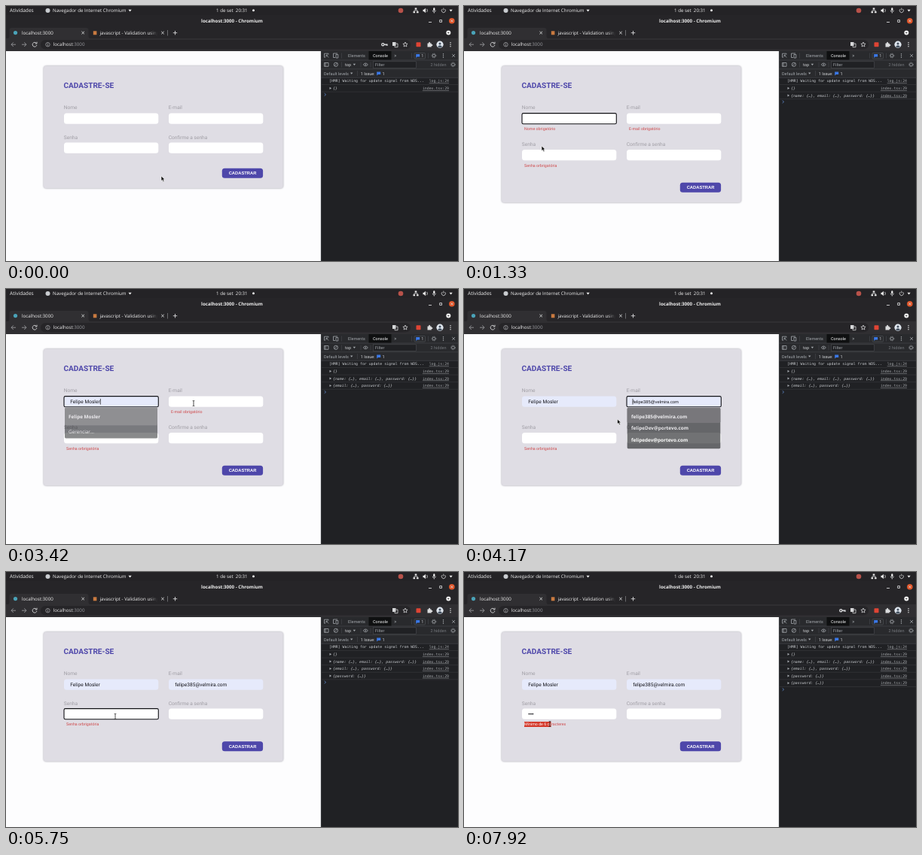
Recreate the animation shown at these times as an HTML page. Size 600 px wide and 339 px high, loop 8000 ms.

```html
<!DOCTYPE html>
<html lang="pt-BR">
<head>
<meta charset="utf-8">
<title>Cadastro</title>
<style>
  html, body { margin: 0; width: 100%; height: 100%; overflow: hidden; background: #fdfdfe; }
  svg { display: block; width: 100%; height: 100%; }
  text { text-rendering: geometricPrecision; white-space: pre; }
  .sys { font-family: "Open Sans", "Noto Sans", sans-serif; font-size: 6.2px; fill: #f0f0f0; }
  .bold { font-weight: 700; }
  .dev { font-family: Roboto, sans-serif; font-size: 5.5px; fill: #a4a8ad; }
  .mono { font-family: "DejaVu Sans Mono", monospace; font-size: 4.87px; fill: #c6c9cd; }
  .link { fill: #a2a5a9; text-decoration: underline; text-anchor: end; }
  .label { font-family: Roboto, sans-serif; font-size: 6.6px; fill: #a09ea5; }
  .value { font-family: Roboto, sans-serif; font-size: 6.6px; fill: #15151a; }
  .preview { font-family: "Liberation Sans", Arial, sans-serif; font-size: 5.8px; }
  .error { font-family: Roboto, sans-serif; font-size: 5.3px; fill: #cf4a4c; }
  .menu text { font-family: "Open Sans", "Noto Sans", sans-serif; font-size: 6.5px; fill: #fafafa; }
  .icon { fill: none; stroke: #d6d7d9; stroke-width: .9; }
  .dim { stroke: #98999c; }
  #card { filter: drop-shadow(0 .7px .9px rgba(40, 36, 60, .45)); }
</style>
</head>
<body>
<svg viewBox="0 0 600 339" preserveAspectRatio="none">
  <defs>
    <linearGradient id="fade">
      <stop offset="0" stop-color="#262528" stop-opacity="0"/>
      <stop offset="1" stop-color="#262528"/>
    </linearGradient>
    <clipPath id="tabClip"><rect x="120" y="28" width="81" height="15"/></clipPath>
    <clipPath id="selClip"><rect id="selArea" x="80" y="198.500" width="0" height="8"/></clipPath>
  </defs>
  <rect width="600" height="339" fill="#fdfdfe"/>

  <!-- desktop bar -->
  <rect width="600" height="12" fill="#242326"/>
  <g class="sys">
    <text x="5" y="8.200" style="font-size:6.6px">Atividades</text>
    <circle cx="55.500" cy="6" r="3" fill="#c9ccd0"/>
    <text x="62" y="8.200">Navegador de Internet Chromium</text>
    <path d="M162.500 4.800h4.200l-2.100 2.800z"/>
    <text x="279" y="8.200">1 de set  20:31</text>
    <circle cx="328.500" cy="5.800" r="1.500"/>
    <path d="M588.500 4.800h4.200l-2.100 2.800z"/>
    <path d="M553.500 4.800h1.500l2-2v6.400l-2-2h-1.500z"/>
    <rect x="567.200" y="2.300" width="2.200" height="4.300" rx="1.100"/>
    <path d="M542.700 2.500h2.600v2h-2.600zM540.500 7.200h2.600v2h-2.600zM545 7.200h2.600v2h-2.600z"/>
  </g>
  <circle cx="524" cy="6" r="3.300" fill="#b8524a"/>
  <path class="icon" style="stroke-width:.8" d="M544 4.500v1.400M541.800 7.200v-1.300h4.500v1.300M558.500 3.800q1.800 2.200 0 4.400M566.200 5.800q.2 2.100 2.100 2.100t2.100-2.100M568.300 7.900v1.700M579.200 4a2.600 2.600 0 1 0 3.200 0M580.800 2.600v3"/>

  <!-- window title and tabs -->
  <rect y="12" width="600" height="31" fill="#262528"/>
  <text class="sys bold" x="300" y="22.300" text-anchor="middle">localhost:3000 - Chromium</text>
  <circle cx="591.800" cy="19.700" r="3.800" fill="#e2582c"/>
  <path class="icon" d="M561 21.500h4M575.700 18.600h2.800v2.800h-2.800zM590.500 18.400l2.600 2.600m0-2.600l-2.600 2.600"/>
  <circle cx="587.300" cy="35.600" r="3" fill="#f0f0f0"/>
  <path d="M585.900 35l1.400 1.500 1.400-1.500z" fill="#262528"/>
  <path d="M2 43q2.500 0 2.500-3v-8q0-3 3-3h99q3 0 3 3v8q0 3 2.500 3z" fill="#302f32"/>
  <circle cx="12.500" cy="35.600" r="2.600" fill="#4aa3b8"/>
  <text class="sys" x="21" y="37.800">localhost:3000</text>
  <rect x="115.800" y="33.300" width="4.600" height="5" fill="#c97a40"/>
  <g clip-path="url(#tabClip)">
    <text class="sys" x="124.500" y="37.800">javascript - Validation using</text>
    <rect x="191" y="29" width="10" height="13" fill="url(#fade)"/>
  </g>
  <path class="icon" d="M100.400 33.800l3.600 3.600m0-3.600l-3.600 3.600M206.200 33.800l3.600 3.600m0-3.600l-3.600 3.600M224.500 33v5.400m-2.700-2.700h5.400"/>
  <path class="icon dim" style="stroke-width:.6" d="M214.500 32v7.500"/>

  <!-- address bar -->
  <rect y="43" width="600" height="17" fill="#302f32"/>
  <rect x="46" y="45" width="491" height="12.500" rx="6.250" fill="#262528"/>
  <path class="icon dim" d="M13 51.200H7m2.800-2.800L7 51.200 9.800 54M21 51.200h6m-2.800-2.800l2.800 2.800-2.800 2.800"/>
  <path class="icon" d="M40.200 49.300a2.900 2.900 0 1 0 .7 2.500M41 47.700v2.300h-2.300"/>
  <circle class="icon dim" cx="55.500" cy="51.200" r="2.700"/>
  <path class="icon dim" d="M55.500 50.700v2.200M55.500 49.300v.8"/>
  <text class="sys" x="62.700" y="53.300">localhost<tspan fill="#9a9ca0">:3000</tspan></text>
  <g id="key" fill="none" stroke="#e2e3e5" stroke-width="1.200">
    <circle cx="500.300" cy="51.200" r="1.600"/>
    <path d="M502 51.200h4v1.700M504.300 51.200v1.400"/>
  </g>
  <path fill="#d6d7d9" d="M513 48h4.500v5H513z"/>
  <path class="icon" style="stroke-width:.8" d="M517.500 50h2.500v4.700h-4v-1.600M514 49.500l2 2m0-2l-2 2M530 48l.9 2.100 2.200.2-1.700 1.500.5 2.200-1.900-1.200-1.900 1.200.5-2.200-1.700-1.500 2.200-.2z"/>
  <rect x="544.500" y="48.300" width="6" height="6" rx=".8" fill="#df4434"/>
  <path fill="#dadbdd" d="M559.500 49.500h1.600q-.2-1.700 1-1.700t1 1.700h1.600v1.600q1.700-.2 1.700 1t-1.700 1v1.500h-5.200z"/>
  <circle cx="576" cy="51.200" r="4.600" fill="#dfe6ee"/>
  <circle cx="576" cy="50" r="1.500" fill="#43505f"/>
  <path d="M572.900 54q3.100-3.600 6.200 0-3.100 2.500-6.200 0z" fill="#43505f"/>
  <g fill="#d6d7d9"><circle cx="590" cy="48.700" r=".8"/><circle cx="590" cy="51.200" r=".8"/><circle cx="590" cy="53.700" r=".8"/></g>

  <!-- devtools -->
  <rect x="418" y="60" width="182" height="279" fill="#202124"/>
  <rect x="418" y="60" width="182" height="35.300" fill="#292a2d"/>
  <rect x="481.500" y="60" width="30" height="12" fill="#0f1011"/>
  <path stroke="#47494d" stroke-width=".6" fill="none" d="M418.300 60v279M418 72h182M418 83.800h182M418 95.300h182M445.500 62.500v7M538.500 62.500v7M560.500 62.500v7M445.500 74.500v7M466.500 86v7M471 74.500v7M484 74.500v7"/>
  <g class="dev">
    <text x="454" y="67.900">Elements</text>
    <text x="487" y="67.900" style="fill:#f1f2f3">Console</text>
    <text x="515" y="68.200" style="font-size:7px">»</text>
    <text x="450" y="79.800" style="fill:#d5d7da">top</text>
    <path d="M460.700 76.800h3.400l-1.700 2.300zM457 88.500h3.400l-1.700 2.300z"/>
    <rect x="487.500" y="73.800" width="57" height="8.600" fill="#202124" stroke="#4c4e52" stroke-width=".6"/>
    <text x="490" y="79.900">Filter</text>
    <text x="563.500" y="79.800" style="fill:#75787d">2 hidden</text>
    <text x="422" y="91.500">Default levels</text>
    <text x="470.700" y="91.500" style="fill:#d5d7da">1 Issue:</text>
    <rect x="542" y="62.500" width="14.500" height="7.500" rx="1" fill="none" stroke="#55585d" stroke-width=".6"/>
    <path fill="#3b78e7" d="M544.200 64h5v3.600h-3.300l-1.700 1.500zM492.200 87.500h5v3.600h-3.300l-1.700 1.500z"/>
    <text x="551.300" y="67.900" style="fill:#d5d7da">1</text>
    <text x="499.500" y="91.500" style="fill:#d5d7da">1</text>
    <g><circle cx="580.500" cy="63.800" r=".7"/><circle cx="580.500" cy="66" r=".7"/><circle cx="580.500" cy="68.200" r=".7"/></g>
  </g>
  <g class="icon" style="stroke:#a4a8ad;stroke-width:.8">
    <path d="M428 64.500v-1.300h-5.500v5h1.500M425 65.200l3.200 3.200m-3.200-3.200v2.300m0-2.300h2.300M434.500 63h5.500M434.500 63v5.500h2.500M438 64.500h2.800v4.500H438zM592.200 64l3.800 3.800m0-3.800l-3.800 3.800M422.500 75.500h5.500v4.800h-5.500zM424.200 75.500v4.800M436 79.600l3.800-3.800M474.200 77.900q3.100-3.800 6.200 0-3.100 3.800-6.200 0z"/>
    <circle cx="437.900" cy="77.800" r="2.600"/><circle cx="477.300" cy="77.900" r=".6"/>
    <circle cx="568" cy="66" r="1.900"/><circle cx="593.500" cy="77.900" r="1.900"/>
    <g stroke-dasharray=".8 1.080"><circle cx="568" cy="66" r="2.900"/><circle cx="593.500" cy="77.900" r="2.900"/></g>
  </g>
  <g id="log"></g>
  <path id="prompt" class="icon" style="stroke:#5a82c0" d="M422.700 -1.700l1.900 1.700-1.900 1.700"/>

  <!-- form -->
  <rect id="card" x="50" y="79.800" width="317.800" height="162.400" rx="3.500" fill="#dfdde4"/>
  <text x="76.500" y="109" font-family="Roboto, sans-serif" font-size="10.050" font-weight="700" fill="#4e47aa">CADASTRE-SE</text>
  <g id="top">
    <text class="label" x="76.800" y="137.300">Nome</text>
    <text class="label" x="215.800" y="137.300">E-mail</text>
    <rect id="nameBox" x="77" y="142.600" width="125.300" height="14.200"/>
    <rect id="mailBox" x="216" y="142.600" width="125.300" height="14.200"/>
    <text id="nameText" x="85.300" y="152.100">Felipe Mosler</text>
    <text id="mailText" x="224.200" y="152.100">felipe385@velmira.com</text>
    <text id="nameErr" class="error" x="80" y="165.200">Nome obrigatório</text>
    <text id="mailErr" class="error" x="219" y="165.200">E-mail obrigatório</text>
  </g>
  <g id="bottom">
    <text class="label" x="76.800" y="176.500">Senha</text>
    <text class="label" x="215.800" y="176.500">Confirme a senha</text>
    <rect id="passBox" x="77" y="181.600" width="125.300" height="14.200"/>
    <rect x="216" y="181.600" width="125.300" height="14.200" rx="3.500" fill="#fff"/>
    <g id="dots" fill="#15151a"><circle cx="86.500" cy="188.700" r=".9"/><circle cx="88.900" cy="188.700" r=".9"/><circle cx="91.300" cy="188.700" r=".9"/></g>
    <text id="passErr" class="error" x="80" y="204.100"></text>
    <g clip-path="url(#selClip)">
      <rect x="80" y="199" width="60" height="7" fill="#d4382a"/>
      <text class="error" x="80" y="204.100" style="fill:#fff">Mínimo de 6 caracteres</text>
    </g>
  </g>
  <g id="button">
    <rect x="286.800" y="215.700" width="54.300" height="13.100" rx="3.500" fill="#4e47aa"/>
    <text x="314" y="224.400" text-anchor="middle" font-family="Liberation Sans, Arial, sans-serif" font-weight="700" font-size="5.800" fill="#fff">CADASTRAR</text>
  </g>
  <path id="caret" stroke="#111" stroke-width=".7" d="M0 -3.800v7.600"/>

  <g id="nameMenu" class="menu">
    <rect x="76.500" y="157.600" width="126" height="41.400" rx="1.500" fill="#1e2022"/>
    <rect id="nameHover" x="76.500" y="157.600" width="126" height="23.400" rx="1.500" fill="#484849"/>
    <path d="M76.500 181h126" stroke="#4a4c4f" stroke-width=".6"/>
    <text class="bold" x="81.700" y="171.500">Felipe Mosler</text>
    <text x="81.700" y="192.300">Gerenciar…</text>
  </g>
  <g id="mailMenu" class="menu">
    <rect x="215.500" y="157.600" width="126" height="55.200" rx="1.500" fill="#1e2022"/>
    <rect id="mailHover" x="215.500" y="157.600" width="126" height="20.200" rx="1.500" fill="#3c3c3e"/>
    <g class="bold">
      <text x="221" y="171.700">felipe385@velmira.com</text>
      <text x="221" y="187.500">felipeDev@portevo.com</text>
      <text x="221" y="203.300">felipedev@portevo.com</text>
    </g>
  </g>

  <g id="pointer">
    <path id="arrow" d="M0 0v6.600l1.600-1.400 1.100 2.500 1.300-.6-1.100-2.400h2.100z" fill="#111" stroke="#fff" stroke-width=".6"/>
    <path id="beam" d="M-1.300 -3.600q1.300 0 1.300.8v5.600q0 .8-1.300.8M1.300 -3.600q-1.300 0-1.300.8M1.300 3.600q-1.300 0-1.300-.8" fill="none" stroke="#222" stroke-width=".8"/>
    <path id="hand" d="M-.8 0q.8-.9 1.500 0v2.600l3 .7q.8.300.6 1.300l-.6 3h-3.900l-2.400-3.200q.5-.9 1.800.1z" fill="#111" stroke="#fff" stroke-width=".6"/>
  </g>
</svg>
<script>
const LOOP = 8000;
const $ = id => document.getElementById(id);
const show = (id, on) => $(id).setAttribute('display', on ? 'inline' : 'none');
const shift = (id, y) => $(id).setAttribute('transform', `translate(0 ${y})`);
const clamp = (v, lo, hi) => Math.min(hi, Math.max(lo, v));

const SUBMIT = 830, NAME_OPEN = 2500, NAME_HOVER = 2920, NAME_SET = 3330,
      MAIL_OPEN = 3720, MAIL_HOVER = 3900, MAIL_SET = 4100, MAIL_VALID = 4250,
      PASS_FOCUS = 4760, TYPING = 5830, SELECT = 7200;
const CARD_H = 162.4, ERROR_H = 9.5, ROW = 9.6;

// time, x, y, shape while heading to the next point
const path = [
  [0, 206, 226, 'arrow'], [80, 206, 226, 'arrow'], [330, 303, 222, 'hand'],
  [900, 303, 222, 'arrow'], [1330, 103, 186, 'arrow'], [1500, 101, 169, 'arrow'],
  [1580, 101, 169, 'arrow'], [2080, 108, 149, 'beam'], [2250, 103, 149, 'beam'],
  [2580, 104, 150, 'arrow'], [2830, 112, 161, 'arrow'], [3250, 112, 165, 'arrow'],
  [3420, 249, 152, 'beam'], [3700, 249, 152, 'arrow'], [3920, 236, 168, 'arrow'],
  [4080, 236, 168, 'arrow'], [4170, 203.5, 173, 'arrow'], [4600, 150, 188, 'beam'],
  [5000, 148, 191, 'beam'], [5080, 145, 192, 'beam'], [6580, 145, 192, 'beam'],
  [7100, 81, 202, 'beam'], [7250, 81, 202, 'beam'], [7670, 114, 202, 'beam'],
  [LOOP, 114, 202, 'beam']
];

const rows = [
  [0, '[HMR] Waiting for update signal from WDS...', 'log.js:24'],
  [0, '{}'],
  [SUBMIT, '{name: {…}, email: {…}, password: {…}}'],
  [NAME_SET + 20, '{email: {…}, password: {…}}'],
  [MAIL_VALID, '{password: {…}}'],
  [TYPING, '{password: {…}}']
];
$('log').innerHTML = rows.map(([, text, link], i) => {
  const y = 99.7 + i * ROW;
  const fold = link ? '' : `<path d="M429.500 ${y - 1.6}l2.600 1.600-2.600 1.600z" fill="#a4a8ad"/>`;
  return `<g id="row${i}">${fold}
    <text class="mono" x="${link ? 429 : 434}" y="${y + 1.7}" ${link ? '' : 'font-style="italic"'}>${text}</text>
    <text class="mono link" x="588" y="${y + 1.7}">${link || 'index.tsx:29'}</text>
    <path d="M418.500 ${y + 4.8}h181.500" stroke="#3a3b3f" stroke-width=".6"/></g>`;
}).join('');

function pointerAt(t) {
  let i = 0;
  while (i < path.length - 2 && t >= path[i + 1][0]) i++;
  const [t0, x0, y0, kind] = path[i], [t1, x1, y1] = path[i + 1];
  const p = clamp((t - t0) / (t1 - t0), 0, 1), e = p * p * (3 - 2 * p);
  return { x: x0 + (x1 - x0) * e, y: y0 + (y1 - y0) * e, kind };
}

function setBox(id, focused, filled) {
  const box = $(id);
  box.setAttribute('fill', filled ? '#e6eafb' : '#fff');
  box.setAttribute('stroke', focused ? '#101014' : 'none');
  box.setAttribute('stroke-width', 1.1);
  box.setAttribute('rx', focused ? 1.8 : 3.5);
}

function setValue(id, visible, preview) {
  show(id, visible);
  $(id).setAttribute('class', preview ? 'value preview' : 'value');
}

// opens at once, then fades while shrinking slightly
function setMenu(name, t, open, hover, close, cx, cy) {
  const p = clamp((t - close) / 190, 0, 1), s = 1 - .05 * p, menu = $(name + 'Menu');
  show(name + 'Menu', t >= open && p < 1);
  show(name + 'Hover', t >= hover);
  menu.setAttribute('opacity', 1 - p);
  menu.setAttribute('transform', `translate(${cx} ${cy}) scale(${s}) translate(${-cx} ${-cy})`);
}

function setCaret(t, low) {
  const spots = [
    [SUBMIT, 85.5, 149.7], [2330, 85.5, 149.7], [NAME_SET - 40, 125.4, 149.7],
    [MAIL_OPEN, 224, 149.7], [MAIL_VALID, 294.5, 149.7], [PASS_FOCUS, 85.5, 188.7],
    [TYPING, 88, 188.7], [6000, 90.4, 188.7], [6170, 92.8, 188.7]
  ];
  const spot = spots.filter(s => s[0] <= t).pop();
  const on = spot && t < SELECT && (t - spot[0]) % 1000 < 500;
  show('caret', on);
  if (on) $('caret').setAttribute('transform', `translate(${spot[1]} ${spot[2] + (spot[2] > 170 ? low : 0)})`);
}

function draw(t) {
  const submitted = t >= SUBMIT;
  const low = submitted && t < MAIL_VALID ? ERROR_H : 0;
  const extra = low + (submitted ? ERROR_H : 0);
  shift('bottom', low);
  shift('button', extra);
  $('card').setAttribute('height', CARD_H + extra);

  const nameSeen = t >= NAME_HOVER, mailSeen = t >= MAIL_HOVER;
  setBox('nameBox', submitted && t < MAIL_OPEN, nameSeen);
  setBox('mailBox', t >= MAIL_OPEN && t < PASS_FOCUS, mailSeen);
  setBox('passBox', t >= PASS_FOCUS && t < SELECT, false);
  setValue('nameText', nameSeen, t < NAME_SET - 40);
  setValue('mailText', mailSeen, t < MAIL_VALID);
  show('nameErr', submitted && t < NAME_SET);
  show('mailErr', submitted && t < MAIL_SET);
  show('passErr', submitted);
  $('passErr').textContent = t < TYPING ? 'Senha orbrigatória' : 'Mínimo de 6 caracteres';
  [...$('dots').children].forEach((dot, i) =>
    dot.setAttribute('display', t >= TYPING + i * 170 ? 'inline' : 'none'));
  show('key', t < SUBMIT || t >= TYPING);
  setCaret(t, low);
  setMenu('name', t, NAME_OPEN, NAME_HOVER, NAME_SET, 139.5, 178);
  setMenu('mail', t, MAIL_OPEN, MAIL_HOVER, MAIL_SET, 278.5, 185);

  rows.forEach(([at], i) => show('row' + i, t >= at));
  shift('prompt', 98.6 + rows.filter(r => t >= r[0]).length * ROW);

  const m = pointerAt(t);
  $('pointer').setAttribute('transform', `translate(${m.x} ${m.y})`);
  for (const kind of ['arrow', 'beam', 'hand']) show(kind, kind === m.kind);
  $('selArea').setAttribute('width', t >= 7250 ? clamp(m.x - 78.5, 0, 56) : 0);
}

const start = performance.now();
function tick() {
  draw((performance.now() - start) % LOOP);
  requestAnimationFrame(tick);
}
draw(0);
requestAnimationFrame(tick);
</script>
</body>
</html>
```
